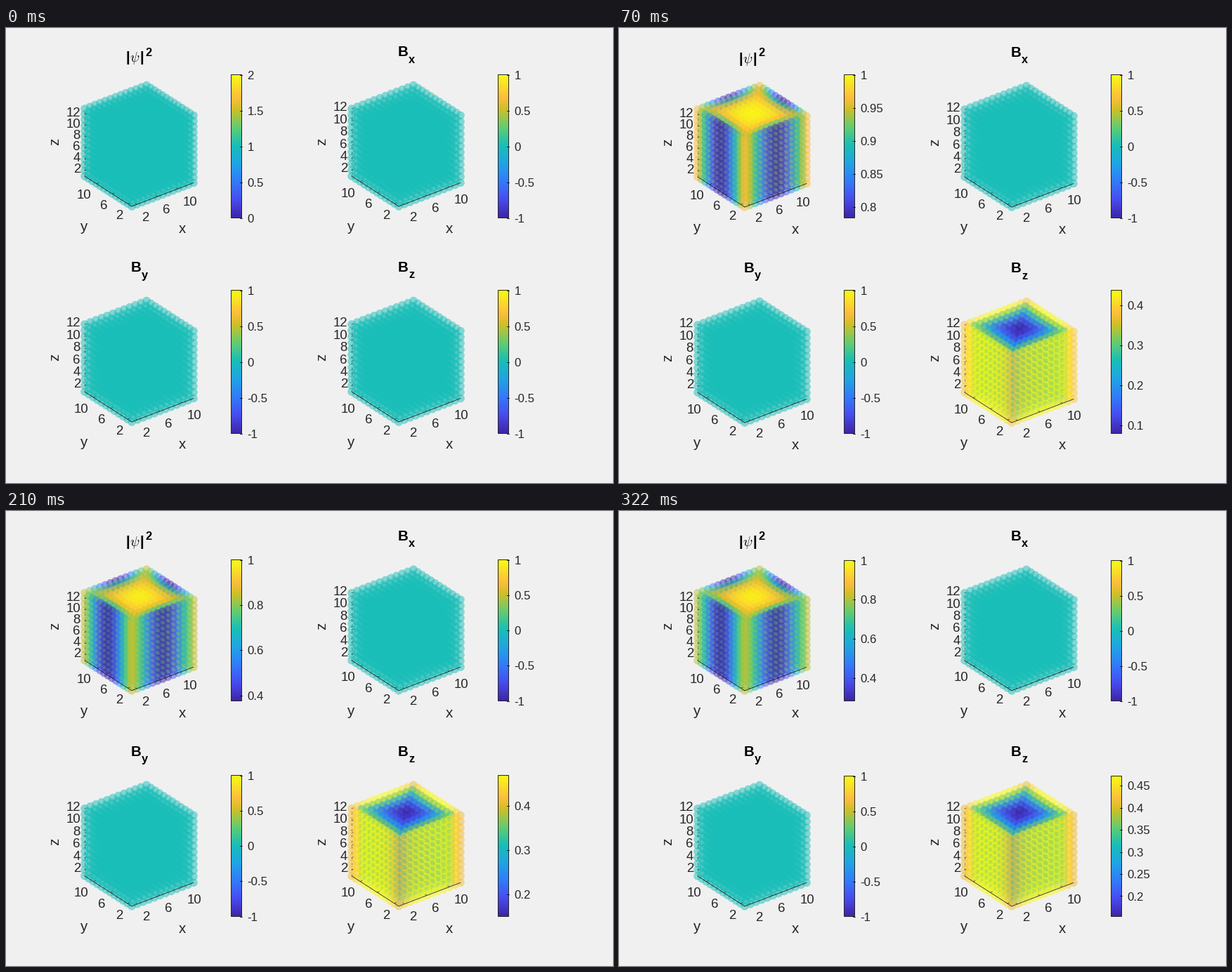
Recreate the animation shown at these times as a matplotlib script. Size 864 by 648 pixels, loop 0.35 s.

```python
import numpy as np
import matplotlib.pyplot as plt
from matplotlib.animation import FuncAnimation
from matplotlib.colors import LinearSegmentedColormap
from matplotlib.patches import Rectangle

W, H, DPI = 864, 648, 100
PT = 72 / DPI
INK = "#262626"
plt.rcParams["font.family"] = "Liberation Sans"

stops = "#3e26a8 #484df0 #327cfc #20a5e3 #19bfb6 #64cd6f #d1bf27 #febe3c #f9fb15".split()
places = np.r_[0:49:8, 53, 63] / 63
parula = LinearSegmentedColormap.from_list("parula", list(zip(places, stops)))

# Projected cube: front bottom corner and the three edge vectors (y down)
CORNER = np.array([179, 254])
EX, EY, EZ = np.array([[88, -33.5], [-67, -43], [0, -96]])
DOT, ALPHA = 11.6, 0.5

# Text heights in pixels
TICK, LABEL, BAR_FONT, SUB = 18.67, 20.5, 16.8, 16.4


def relax(k, first, last, rate):
    """Exponential approach from `first` at step 1 towards `last`."""
    return last + (first - last) * rate ** (k - 1)


def lattice(n):
    """Unit grid coordinates, ordered from far to near."""
    g = np.linspace(0, 1, n)
    u, v, w = (a.ravel() for a in np.meshgrid(g, g, g, indexing="ij"))
    depth = (67 * u + 88 * v) * .866 - 55.5 * w
    order = np.argsort(-depth, kind="stable")
    return u[order], v[order], w[order]


grids = {n: lattice(n) for n in (12, 13)}


def flat(u, v, k):
    return np.full_like(u, .5)


def density(u, v, k):
    """Depleted at the middle of each side face, recovering inwards."""
    low = (1 - relax(k, .83, .72, .5)) / 2
    decay = relax(k, .42, .49, .5)

    def wall(t):
        return decay ** (12 * np.minimum(t, 1 - t))

    def along(t):
        return low + (1 - low) * np.abs(np.sin(np.pi * t)) ** 1.2

    return np.clip(1 - wall(u) * along(v) - wall(v) * along(u), 0, 1)


def field_z(u, v, k):
    """Screened inside, strongest on the faces, a bit weaker at the edges."""
    p, q = abs(2 * u - 1), abs(2 * v - 1)
    drop = relax(k, .13, .19, .4)
    return np.maximum(p, q) ** 2 - drop * np.minimum(p, q) ** 3


def ticks(lo, hi):
    """Multiples of the smallest round step that gives at most six ticks."""
    for step in (.02, .05, .1, .2, .5):
        first, last = np.ceil(lo / step - 1e-6), np.floor(hi / step + 1e-6)
        if last - first < 6:
            break
    return np.arange(first, last + 1) * step


fig = plt.figure(figsize=(W / DPI, H / DPI), dpi=DPI, facecolor="#f0f0f0")
ax = fig.add_axes([0, 0, 1, 1])


def write(x, y, s, size, ha="center", rise=.36, **kw):
    """Text whose glyph middle, `rise` em above the baseline, lies at y."""
    kw.setdefault("color", INK)
    ax.text(x, y + rise * size, s, fontsize=size * PT, ha=ha, va="baseline", **kw)


def line(a, b, **kw):
    ax.plot([a[0], b[0]], [a[1], b[1]], color="black", lw=.8 * PT, zorder=4, **kw)


def draw_cube(org, n, values):
    u, v, w = grids[n]
    base = org + CORNER
    pts = base + np.outer(u, EX) + np.outer(v, EY) + np.outer(w, EZ)
    ax.scatter(pts[:, 0], pts[:, 1], s=(DOT * PT) ** 2, c=parula(values),
               alpha=ALPHA, linewidths=0, zorder=2)

    left = base + EY
    line(base, base + EX, alpha=.85)
    line(base, left, alpha=.85)
    line(left, left + EZ, alpha=.5, ls=(0, (4, 6)))
    for t in (2, 6, 10):
        f = (t - 1) / (n - 1)
        px, py = base + f * EX, base + f * EY
        line(px, px + EY * .03, alpha=.7)
        line(py, py + EX * .03, alpha=.7)
        write(px[0] + 7, px[1] + 17, str(t), TICK, ha="left")
        write(py[0] - 7, py[1] + 15, str(t), TICK, ha="right")
    for t in range(2, 13, 2):
        pz = left + (t - 1) / (n - 1) * EZ
        line(pz, pz + EX * .025, alpha=.6)
        write(org[0] + 106, pz[1] - 3.5, str(t), TICK, ha="right")

    x0, y0 = org
    write(x0 + 251, y0 + 287, "x", LABEL, rise=.26)
    write(x0 + 111, y0 + 286, "y", LABEL, rise=.16)
    ax.text(x0 + 69.5, y0 + 162, "z", fontsize=LABEL * PT, color=INK,
            rotation=90, ha="center", va="center")


def draw_bar(x0, y0, top, lo, hi):
    left, right, top, bottom = x0 + 320.5, x0 + 335.5, y0 + top, y0 + 270.5
    ax.imshow(np.linspace(1, 0, 256)[:, None], cmap=parula, aspect="auto",
              extent=(left, right, bottom, top), vmin=0, vmax=1, zorder=2)
    ax.add_patch(Rectangle((left, top), right - left, bottom - top, fill=False,
                           ec=INK, lw=PT, zorder=3, snap=False))
    for value in ticks(lo, hi):
        y = bottom - (value - lo) / (hi - lo) * (bottom - top)
        line((right - 2.5, y), (right, y))
        write(x0 + 343.5, y, f"{round(value, 4) + 0:g}", BAR_FONT, ha="left")


def draw_title(x0, y0, axis):
    bold = dict(weight="bold", color="black", rise=0)
    if axis:
        write(x0 + 185, y0 + 40, "B", LABEL, **bold)
        write(x0 + 197, y0 + 49.5, axis, SUB, **bold)
        return
    for x in (173.5, 193.5):
        write(x0 + x, y0 + 48.5, "|", LABEL, **bold)
    write(x0 + 183.5, y0 + 48.5, r"$\psi$", 19.5, rise=0, color="black",
          math_fontfamily="cm")
    write(x0 + 202.5, y0 + 39.5, "2", SUB, **bold)


def draw(k):
    ax.clear()
    ax.axis("off")
    shift = 2 * (1 - .5 ** k)
    top = 66.5 + round(4 / 3 * max(k - 1, 0))
    psi, bz = (0, 2, flat), (-1, 1, flat)
    if k:
        psi = relax(k, .783, .152, .595), 1, density
        bz = relax(k, .079, .1555, .28), relax(k, .437, .4735, .33), field_z
    panels = [(0, 0, "", 13, psi), (380, 0, "x", 12, (-1, 1, flat)),
              (0, 307, "y", 12, (-1, 1, flat)), (380, 307, "z", 12, bz)]
    for x0, y0, axis, n, (lo, hi, field) in panels:
        u, v, _ = grids[n]
        draw_cube(np.array([x0, y0 + shift]), n, field(u, v, k))
        draw_bar(x0, y0, top, lo, hi)
        draw_title(x0, y0 + shift, axis)
    ax.set_xlim(0, W)
    ax.set_ylim(H, 0)
    return []


anim = FuncAnimation(fig, draw, frames=5, interval=70, repeat=True,
                     repeat_delay=0, init_func=lambda: [], blit=False)
plt.show()
```
